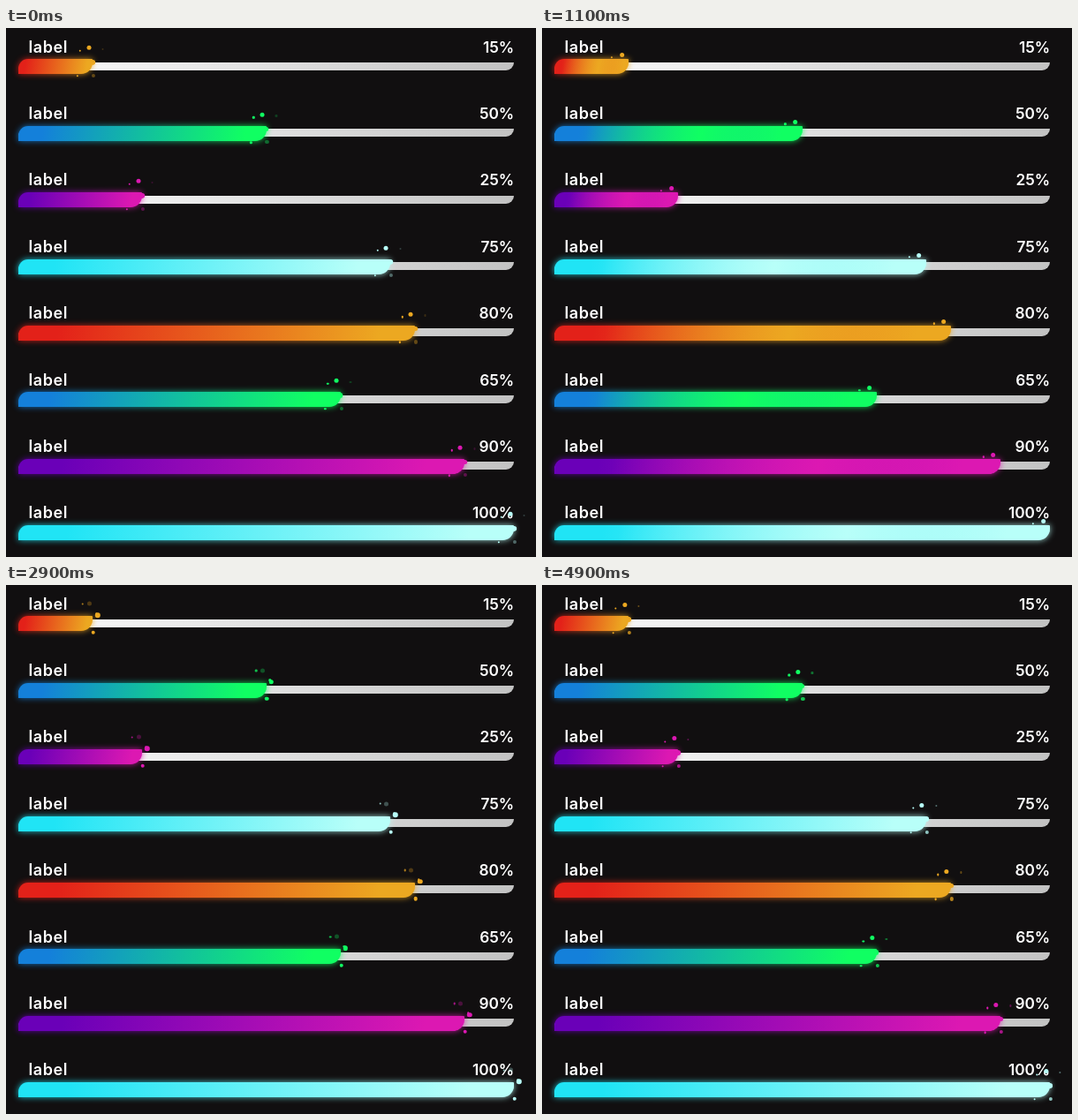
These frames come from a looping animation (600x599 px, 5 s). An HTML page:

```html
<!DOCTYPE html>
<html lang="en">
<head>
<meta charset="utf-8">
<title>Neon progress bars</title>
<style>
html, body { margin: 0; width: 100%; height: 100%; overflow: hidden; background: #110f10; }
#stage { position: relative; width: 600px; height: 599px; overflow: hidden; --load: 1; --shine: 150%; }
.row { position: absolute; left: 0; width: 600px; height: 60px; }
.row span {
  position: absolute; top: 9.6px; color: #fff;
  font: 600 18px/24px Inter, "Open Sans", sans-serif;
}
.name { left: 25.5px; letter-spacing: .6px; }
.row .value { right: 25px; font-size: 17.3px; letter-spacing: -.1px; }
.track {
  position: absolute; left: 14px; top: 38.8px; width: 561px; height: 9px;
  border-radius: 9px 0 9px 0;
  background: linear-gradient(110deg, #fff, #c2c2c2);
}
.bar {
  position: absolute; left: 14px; top: 35.4px; height: 17px;
  width: calc(561px * var(--part) * var(--load));
}
.bar::before, .bar::after {
  content: ""; position: absolute; inset: 0;
  border-radius: 11px 1px 13px 0;
  background:
    linear-gradient(100deg, transparent calc(var(--shine) - 46%), var(--to) var(--shine), transparent calc(var(--shine) + 46%)),
    linear-gradient(100deg, var(--from) 10%, var(--to) 91%);
}
.bar::before { filter: blur(3.5px); opacity: .85; }
.dot { position: absolute; left: calc(100% + 1px); top: .6px; z-index: 1; border-radius: 50%; background: var(--to); }
</style>
</head>
<body>
<div id="stage"></div>
<script>
const LOOP = 5000, RESTART = 100, PITCH = 75.4;
const themes = [
  ['#e32119', '#eca821'],
  ['#1480da', '#10ff62'],
  ['#6a00b8', '#dc18b2'],
  ['#20e4f5', '#b8fff9']
];
const values = [15, 50, 25, 75, 80, 65, 90, 100];

// Each spark is reborn every `life` seconds and drifts away from the bar's top right corner.
const sparks = [
  { r: 2.5, delay: 0.5, life: 2.5, from: [-9.5, -3.5], to: [-5, -14.5] },
  { r: 1.2, delay: 0.3, life: 2.9, from: [-22, 0], to: [-12, -15] },
  { r: 2.8, delay: 1.4, life: 3.4, from: [-1, 3], to: [13, -8.5] },
  { r: 1.2, delay: 1.6, life: 3.5, from: [0, 0], to: [10.5, -12] },
  { r: 2.1, delay: 1.3, life: 1.9, from: [-4.5, 14.5], to: [0, 18] },
  { r: 1.2, delay: 4.3, life: 2.0, from: [-19, 18], to: [-16, 19] }
];

const stage = document.getElementById('stage');

function add(parent, tag, cls, text = '') {
  const el = document.createElement(tag);
  el.className = cls;
  el.textContent = text;
  parent.append(el);
  return el;
}

const rows = values.map((value, i) => {
  const row = add(stage, 'div', 'row');
  const [from, to] = themes[i % themes.length];
  row.style.top = i * PITCH + 'px';
  row.style.setProperty('--from', from);
  row.style.setProperty('--to', to);
  row.style.setProperty('--part', value / 100);
  add(row, 'div', 'track');
  const bar = add(row, 'div', 'bar');
  add(row, 'span', 'name', 'label');
  add(row, 'span', 'value', value + '%');
  return sparks.map(({ r }) => {
    const dot = add(bar, 'i', 'dot');
    dot.style.width = dot.style.height = 2 * r + 'px';
    dot.style.margin = -r + 'px';
    return dot;
  });
});

const clamp = v => Math.min(1, Math.max(0, v));
const ease = v => { v = clamp(v); return v * v * (3 - 2 * v); };
const mix = (a, b, k) => a + (b - a) * k;

function draw(now) {
  let t = now % LOOP;
  if (t < RESTART) t += LOOP;   // tail of the previous run
  const load = ease((t - RESTART) / 1000);
  const shine = ease(((t - 40) % 3000) / 2000);
  stage.style.setProperty('--load', load);
  stage.style.setProperty('--shine', mix(-50, 150, shine) + '%');

  sparks.forEach(({ delay, life, from, to }, n) => {
    const age = t / 1000 - delay;
    const k = age % life / life;
    const [x, y] = from.map((v, axis) => mix(v, to[axis], ease(k)));
    const alpha = age < 0 ? 0 : clamp((1 - k) / 0.14);
    for (const dots of rows) {
      dots[n].style.opacity = alpha;
      dots[n].style.transform = `translate(${x}px, ${y}px)`;
    }
  });
}

const begin = performance.now();
function tick() {
  draw(performance.now() - begin);
  requestAnimationFrame(tick);
}
tick();
</script>
</body>
</html>
```
